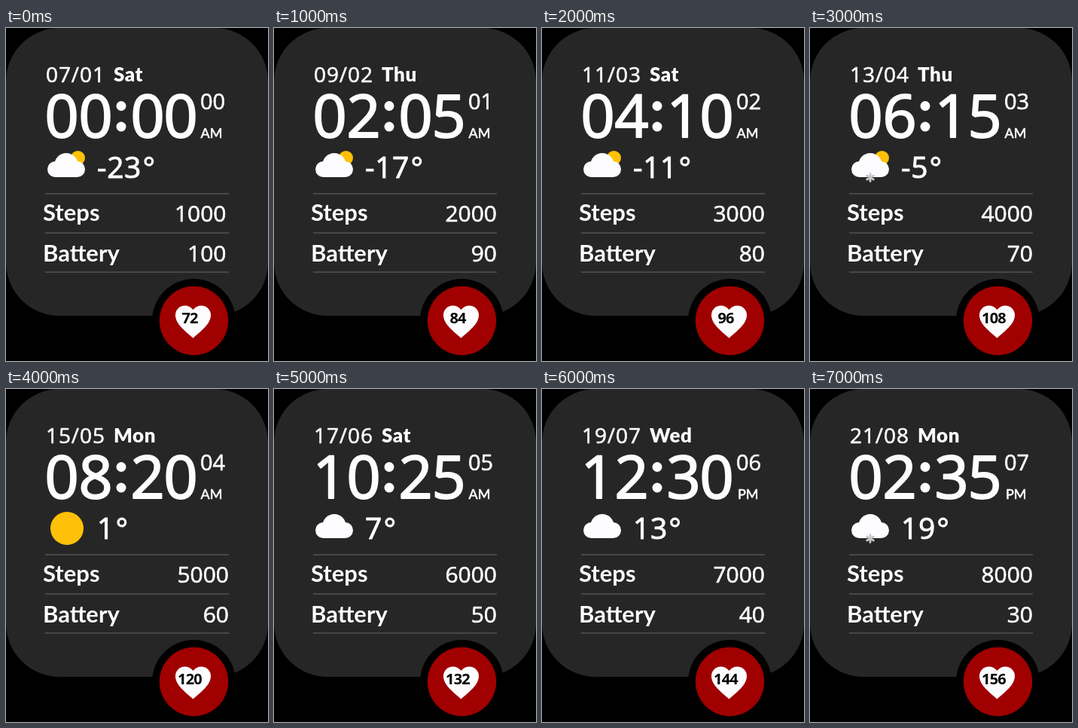
Recreate the animation shown at these times as an HTML page with a canvas. Size 348x442 px, loop 8 s.

```html
<!DOCTYPE html>
<html lang="en">
<head>
<meta charset="utf-8">
<title>Watch face</title>
<style>
  html, body { margin: 0; width: 100%; height: 100%; overflow: hidden; background: #000; }
  canvas { display: block; }
</style>
</head>
<body>
<canvas id="face" width="348" height="442"></canvas>
<script>
const ctx = document.getElementById('face').getContext('2d');
const STEP = 1000, COUNT = 8;
const WHITE = '#fdfdff', SUN = '#ffc107', PANEL = '#262626';
const DAYS = ['Sun', 'Mon', 'Tue', 'Wed', 'Thu', 'Fri', 'Sat'];
const pad = n => String(n).padStart(2, '0');

// Draws text, optionally thickened by a fraction of its size, and returns its width.
function text(value, x, y, size, options = {}) {
  const { family = 'Lato', weight = 400, align = 'left', color = WHITE, spacing = 0, bold = 0 } = options;
  ctx.font = `${weight} ${size}px "${family}", sans-serif`;
  ctx.textAlign = align;
  ctx.letterSpacing = spacing + 'px';
  ctx.fillStyle = ctx.strokeStyle = color;
  ctx.fillText(value, x, y);
  if (bold) {
    ctx.lineWidth = size * bold;
    ctx.lineJoin = 'round';
    ctx.strokeText(value, x, y);
  }
  return ctx.measureText(value).width;
}

const number = (value, x, y, size, options) =>
  text(value, x, y, size, { family: 'Open Sans', bold: 0.022, ...options });

function disc(x, y, r, color) {
  ctx.fillStyle = color;
  ctx.beginPath();
  ctx.arc(x, y, r, 0, Math.PI * 2);
  ctx.fill();
}

function box(x, y, w, h, r, color) {
  ctx.fillStyle = color;
  ctx.beginPath();
  ctx.roundRect(x, y, w, h, r);
  ctx.fill();
}

function snowflake(x, y) {
  ctx.strokeStyle = '#c3c7ca';
  ctx.lineWidth = 2.8;
  ctx.lineCap = 'round';
  ctx.beginPath();
  for (let i = 0; i < 3; i++) {
    const a = Math.PI / 2 + i * Math.PI / 3;
    const dx = 5 * Math.cos(a), dy = 5 * Math.sin(a);
    ctx.moveTo(x - dx, y - dy);
    ctx.lineTo(x + dx, y + dy);
  }
  ctx.stroke();
}

function weather(k) {
  if (k === 4) return disc(81, 185, 22, SUN);
  if (k < 4) disc(95.5, 172.5, 9.5, SUN);
  disc(80, 181.5, 15.5, WHITE);
  box(55, 177, 50, 21, 10.5, WHITE);
  if (k % 4 === 3) snowflake(80, 198.5);
}

function heart() {
  ctx.fillStyle = WHITE;
  ctx.beginPath();
  ctx.moveTo(248.5, 411.5);
  ctx.bezierCurveTo(238, 402, 225, 393, 225, 381);
  ctx.bezierCurveTo(225, 374, 230.5, 368.5, 237.5, 368.5);
  ctx.bezierCurveTo(242, 368.5, 246, 370.5, 248.5, 374);
  ctx.bezierCurveTo(251, 370.5, 255, 368.5, 259.5, 368.5);
  ctx.bezierCurveTo(266.5, 368.5, 272, 374, 272, 381);
  ctx.bezierCurveTo(272, 393, 259, 402, 248.5, 411.5);
  ctx.fill();
}

function clock(k) {
  const hour = 2 * k, digits = pad(hour % 12 || hour) + pad(5 * k);
  [74, 119, 188, 232].forEach((x, i) => number(digits[i], x, 144.5, 79, { align: 'center', bold: 0.026 }));
  disc(153, 103.5, 6.5, WHITE);
  disc(153, 131, 6.5, WHITE);
  number(pad(k), 258, 107.5, 29);
  text(hour < 12 ? 'AM' : 'PM', 287.5, 146, 18, { align: 'right', bold: 0.035 });
}

function draw(k) {
  ctx.fillStyle = '#000';
  ctx.fillRect(0, 0, 348, 442);
  box(0, 0, 348, 382, 71, PANEL);
  disc(249.5, 388.5, 55.5, '#000');
  disc(249.5, 388.5, 45.7, '#a00000');

  const date = new Date(2023, k, 7 + 2 * k);
  number(`${pad(date.getDate())}/${pad(k + 1)}`, 53, 71.5, 28, { spacing: 0.9 });
  text(DAYS[date.getDay()], 143, 71, 26, { weight: 900, spacing: 0.5 });
  clock(k);
  weather(k);
  const width = number(6 * k - 23, 121, 198.5, 39, { spacing: 0.6, bold: 0.026 });
  number('°', 122.5 + width, 198.5, 39, { bold: 0.026 });

  ctx.fillStyle = '#474747';
  for (const y of [219, 271, 323]) ctx.fillRect(52, y, 244, 2);
  const right = k ? 296 : 292.5;
  text('Steps', 49, 256, 31, { weight: 700 });
  text('Battery', 49, 310, 31, { weight: 700 });
  number(1000 * (k + 1), right, 256.5, 30, { align: 'right' });
  number(100 - 10 * k, right, 310, 30, { align: 'right' });

  heart();
  number(72 + 12 * k, 244, 391.5, 20,
    { weight: 700, align: 'center', color: '#000', spacing: -0.8, bold: 0 });
}

function tick() {
  draw(Math.floor(performance.now() / STEP) % COUNT);
  requestAnimationFrame(tick);
}
tick();
</script>
</body>
</html>
```
